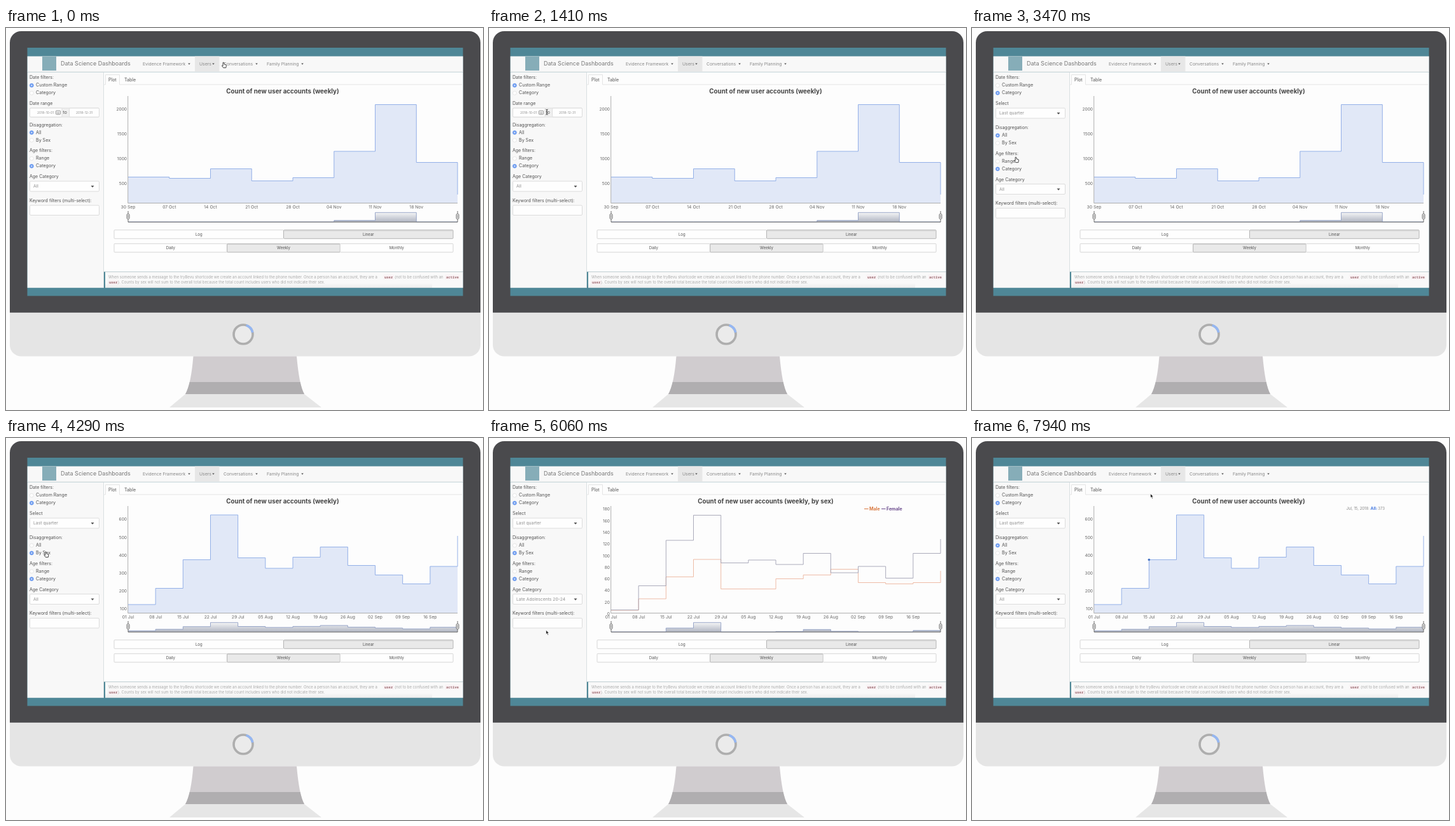
An HTML page with a canvas for the animation above (8000 ms loop, 750 px wide and 601 px high).

```html
<!DOCTYPE html>
<html lang="en">
<head>
<meta charset="utf-8">
<title>Dashboard demo</title>
<style>
  html, body { margin: 0; width: 100%; height: 100%; overflow: hidden; background: #fdfdfd; }
  canvas { display: block; }
</style>
</head>
<body>
<canvas id="stage" width="750" height="601"></canvas>
<script>
const ctx = document.getElementById('stage').getContext('2d');
const LOOP = 8000, LEFT = 192, RIGHT = 710, BASE = 275.5;
const BLUE = '#8aa9e6', ORANGE = '#edb59d', NAVY = '#a2a2b4';
const BORDER = '#dcdcdc';

// Chart data: step heights as stage y; end = height of the closing jump at the right edge
const quarter = {
  title: 'Count of new user accounts (weekly)', mini: .17,
  ticks: [500, 500, 4, 245, -39],
  days: '30 Sep,07 Oct,14 Oct,21 Oct,28 Oct,04 Nov,11 Nov,18 Nov',
  lines: [{ color: BLUE, y: [234.5, 236.5, 221.5, 240.5, 235.5, 194, 120.5, 211.5], end: 262 }]
};
const summer = '01 Jul,08 Jul,15 Jul,22 Jul,29 Jul,05 Aug,12 Aug,19 Aug,26 Aug,02 Sep,09 Sep,16 Sep';
const total = {
  title: quarter.title, mini: .092, days: summer,
  ticks: [100, 100, 6, 269, -28.1],
  lines: [{ color: BLUE, y: [262, 236.5, 191.5, 121, 188.5, 205, 187.5, 171.5, 200.5, 215.5, 229.5, 202], end: 154 }]
};
const bySex = {
  title: 'Count of new user accounts (weekly, by sex)', mini: .19, days: summer, legend: true,
  ticks: [0, 50, 8, 277, -23.6],
  lines: [
    { color: ORANGE, y: [268.5, 241, 224.5, 169.5, 212.5, 223, 207.5, 200.5, 204, 231.5, 231.5, 225.5], end: 208 },
    { color: NAVY, y: [260, 219.5, 186.5, 121.5, 182.5, 192, 182.5, 173, 203.5, 201.5, 221, 182.5], end: 138 }]
};
const lateTeens = {
  title: bySex.title, mini: .26, days: summer, legend: true,
  ticks: [0, 20, 10, 277, -18.28],
  lines: [
    { color: ORANGE, y: [271, 253, 218.5, 191, 237.5, 237.5, 221.5, 215.5, 206.5, 227.5, 229.5, 227.5], end: 209 },
    { color: NAVY, y: [270.5, 232.5, 161, 121.5, 196.5, 192, 199, 181.5, 212, 202, 220.5, 181.5], end: 159 }]
};
const chartTimes = [[0, quarter], [3650, total], [4470, bySex], [5760, lateTeens], [7060, bySex], [7650, total]];

const periods = ['This week', 'Last week', 'This month', 'Last month', 'This quarter', 'Last quarter', 'This year', 'Last year'];
const ages = ['All', 'Early Adolescents 10-14', 'Adolescents 15-19', 'Late Adolescents 20-24', 'Adults 25-34', 'Adults 35-49', 'Adults 50+'];

// Pointer: time, x, y of the tip, shape
const pointer = [
  [0, 342, 54, 'hand'], [900, 342, 54, 'arrow'], [1390, 91, 128, 'beam'], [1560, 91, 128, 'beam'],
  [1650, 74, 121, 'arrow'], [1780, 74, 121, 'arrow'], [2080, 41, 100, 'hand'], [2540, 41, 100, 'hand'],
  [2750, 72, 137, 'hand'], [2900, 72, 137, 'hand'], [3340, 69, 203, 'hand'], [3830, 69, 203, 'hand'],
  [4280, 62.5, 179, 'hand'], [4600, 62.5, 179, 'arrow'], [4940, 78, 250, 'hand'], [5130, 78, 250, 'hand'],
  [5400, 90, 304, 'arrow'], [6030, 90, 304, 'arrow'], [6310, 78, 250, 'hand'], [6480, 78, 250, 'hand'],
  [6760, 74, 264, 'hand'], [6950, 74, 264, 'arrow'], [7400, 45.5, 169, 'hand'], [7560, 45.5, 169, 'arrow'],
  [7650, 195, 125, 'arrow'], [7920, 280.5, 87.5, 'arrow'], [LOOP, 280.5, 87.5, 'arrow']
];

const lastBefore = (list, t) => list.filter(k => k[0] <= t).pop();

function text(s, x, y, size = 7, color = '#505050', align = 'left', weight = 400, family = 'Inter, sans-serif') {
  ctx.font = `${weight} ${size}px ${family}`;
  ctx.fillStyle = color;
  ctx.textAlign = align;
  ctx.textBaseline = 'middle';
  ctx.fillText(s, x, y);
}
function rect(x, y, w, h, fill, stroke, r = 0) {
  ctx.beginPath();
  ctx.roundRect(x, y, w, h, r);
  paint(fill, stroke);
}
function paint(fill, stroke, width = 1) {
  if (fill) { ctx.fillStyle = fill; ctx.fill(); }
  if (stroke) { ctx.strokeStyle = stroke; ctx.lineWidth = width; ctx.stroke(); }
}
function shape(points, fill, stroke, width) {
  ctx.beginPath();
  points.forEach(([x, y]) => ctx.lineTo(x, y));
  if (fill) ctx.closePath();
  paint(fill, stroke, width);
}
function circle(x, y, r, fill, stroke, width) {
  ctx.beginPath();
  ctx.arc(x, y, r, 0, 7);
  paint(fill, stroke, width);
}
function caret(x, y, size = 2, up = 1) {
  shape([[x - size, y - up], [x + size, y - up], [x, y + up * (size - .6)]], '#555');
}

function drawMonitor() {
  rect(0, 0, 750, 601, '#fdfdfd');
  rect(6, 5, 740, 511.5, '#e5e5e5', null, 18);
  rect(6, 5, 740, 442.8, '#4a4a4d', null, [18, 18, 0, 0]);
  rect(33.5, 31, 685, 390.5, '#4f8797');
  circle(373, 482, 15, '#ebebeb', '#aeaeae', 3.6);
  ctx.beginPath();
  ctx.arc(373, 482, 15, -1.25, -.2);
  paint(null, '#95b7f3', 3.6);
  shape([[282, 576], [469, 576], [496, 597], [257, 597]], '#e6e6e6');
  ctx.beginPath();
  ctx.moveTo(294.5, 516.5);
  ctx.quadraticCurveTo(291, 560, 282, 576);
  ctx.lineTo(469, 576);
  ctx.quadraticCurveTo(461, 562, 457, 516.5);
  paint('#d0cccf');
  ctx.save();
  ctx.clip();
  rect(280, 557, 192, 19, '#b0aeb0');
  ctx.restore();
}

function drawNav() {
  rect(33, 44, 687, 25, '#f8f8f8');
  rect(33, 68.5, 687, 1, '#e8e8e8');
  rect(57, 45, 22, 22, '#86adb8');
  text('Data Science Dashboards', 86, 56, 9, '#777');
  rect(297, 44, 38.5, 24.5, '#e7e7e7');
  [['Evidence Framework', 215, 288], ['Users', 304, 326], ['Conversations', 342, 394], ['Family Planning', 410, 466]]
    .forEach(([s, x, c]) => { text(s, x, 56.5, 6.8, '#888'); caret(c, 56.5, 1.8); });
}

function radio(s, y, on) {
  circle(40.3, y, 3, on ? '#6f9df0' : '#fff', on ? '#6f9df0' : '#ddd', .7);
  if (on) circle(40.3, y, 1.1, '#e8effc');
  text(s, 47, y, 7.1);
}
function select(value, y, open) {
  rect(37.5, y - 8, 109, 16, '#fefefe', BORDER, 1.5);
  text(value, 43, y + .3, 6.8, '#909090');
  caret(136, y, 2.5, open ? -1 : 1);
}
function menu(items, top, value, tipY) {
  rect(37.5, top, 109, items.length * 12, '#fff', '#d4d4d4');
  const hover = Math.floor((tipY - top) / 12);
  items.forEach((s, i) => {
    if (i === hover || (hover < 0 && s === value)) rect(38, top + i * 12, 108, 12, '#eef3fa');
    text(s, 43, top + 6 + i * 12, 6.8, '#777');
  });
}

function drawSidebar(t, tipY) {
  const category = t >= 2240, sex = t >= 4290 && t < 7440;
  const period = t < 3470 ? 'This quarter' : 'Last quarter';
  const age = t >= 5470 && t < 6880 ? ages[3] : ages[0];
  const periodOpen = t >= 2820 && t < 3470;
  const ageOpen = (t >= 5000 && t < 5470) || (t >= 6380 && t < 6880);
  const d = category ? 4.5 : 0;

  rect(33, 69.5, 120.5, 340, '#f8f8f8');
  rect(153, 69.5, .7, 340, '#e6e6e6');
  text('Date filters:', 37, 78);
  radio('Custom Range', 90.3, !category);
  radio('Category', 102.3, category);
  if (category) {
    text('Select', 37, 119);
    select(period, 134, periodOpen);
  } else {
    text('Date range', 37, 118.5);
    rect(37.5, 126, 109, 14, '#f0f0f0', BORDER, 1.5);
    rect(37.5, 126, 50.5, 14, '#fefefe', BORDER, 1.5);
    rect(99.5, 126, 47, 14, '#fefefe', BORDER, 1.5);
    text('2018-10-01', 49, 133.2, 5, '#909090');
    text('2018-12-31', 110, 133.2, 5, '#909090');
    rect(78.5, 130, 7, 6, '#f4f4f4', '#999', 1);
    rect(80, 132, 4, .7, '#999');
    rect(80, 134, 4, .7, '#999');
    text('to', 89.5, 133.2);
  }
  text('Disaggregation:', 37, 152.5 + d);
  radio('All', 164.5 + d, !sex);
  radio('By Sex', 176.5 + d, sex);
  text('Age filters:', 37, 193.3 + d);
  radio('Range', 205.3 + d, false);
  radio('Category', 217.3 + d, true);
  text('Age Category', 37, 234 + d);
  select(age, 249 + d, ageOpen);
  text('Keyword filters (multi-select):', 37, 271.5 + d);
  rect(37.5, 279 + d, 109, 15.5, '#fefefe', BORDER, 1.5);
  if (periodOpen) menu(periods, 142.5, period, tipY);
  if (ageOpen) menu(ages, 261.5, age, tipY);
}

function drawButtons(labels, active, y) {
  const w = 533 / labels.length;
  labels.forEach((s, i) => {
    const x = 170 + i * w, on = i === active;
    rect(x, y, w, 13.5, on ? '#e9e9e9' : '#fefefe', on ? '#b4b4b4' : '#d6d6d6', 1);
    if (on) rect(x + .5, y + .5, w - 1, 1.3, '#d2d2d2');
    text(s, x + w / 2, y + 7, 6, '#505050', 'center');
  });
}

function drawFrame() {
  rect(153.7, 69.5, 567, 314, '#fdfdfd');
  shape([[153.7, 89], [156.5, 89], [156.5, 73.5], [178.5, 73.5], [178.5, 89], [717, 89]], null, '#dfdfdf', .8);
  rect(157, 88, 21, 2, '#fdfdfd');
  text('Plot', 161, 81.5);
  text('Table', 186, 81.5);
  drawButtons(['Log', 'Linear'], 1, 317.8);
  drawButtons(['Daily', 'Weekly', 'Monthly'], 1, 339.3);

  rect(156, 384, 564, 26, '#f9f9f9');
  rect(156, 383.5, 564, .8, '#e2e2e2');
  const note = (s, x, y) => text(s, x, y, 5.9, '#aaa');
  const chip = (s, x, y) => {
    rect(x - 1.5, y - 4, s.length * 3.3 + 3, 8, '#f9f2f4', null, 1);
    text(s, x, y, 5.5, '#9d6a70', 'left', 700, '"Noto Sans Mono", monospace');
  };
  note('When someone sends a message to the tryBevu shortcode we create an account linked to the phone number. Once a person has an account, they are a', 161, 392);
  chip('user', 595, 392);
  note('(not to be confused with an', 611, 392);
  chip('active', 692, 392);
  chip('user', 162, 400.3);
  note('). Counts by sex will not sum to the overall total because the total count includes users who did not indicate their sex.', 176, 400.3);
  const shade = ctx.createLinearGradient(0, 401, 0, 409);
  shade.addColorStop(0, 'rgba(0,0,0,0)');
  shade.addColorStop(1, 'rgba(0,0,0,.05)');
  rect(80, 401, 590, 8, shade);
}

// Corner points of a step line through the given heights
function steps(ys) {
  const w = (RIGHT - LEFT) / ys.length;
  return ys.flatMap((y, i) => [[LEFT + i * w, y], [LEFT + (i + 1) * w, y]]);
}
const closed = (points, base) => [[LEFT, base], ...points, [RIGHT, base]];

function drawChart(chart) {
  const { lines, ticks: [first, step, count, y0, dy], days } = chart;
  text(chart.title, 435, 100, 9.75, '#444', 'center', 700);
  if (lines.length === 1) shape(closed(steps(lines[0].y), BASE), '#e1e8f7');
  shape([[191.7, 107], [191.7, BASE], [RIGHT, BASE]], null, '#a6a6a6', .9);
  lines.forEach(l => shape([...steps(l.y), [RIGHT, l.end]], null, l.color, .9));
  for (let i = 0; i < count; i++) text(first + i * step, 190, y0 + i * dy, 6.6, '#666', 'right');
  const names = days.split(','), w = (RIGHT - LEFT) / names.length;
  names.forEach((s, i) => text(s, LEFT + i * w, 282.3, 6.8, '#666', 'center'));

  // Range selector
  const mean = lines[0].y.map((_, i) => lines.reduce((sum, l) => sum + l.y[i], 0) / lines.length);
  const top = Math.min(...mean);
  const small = steps(mean.map(y => Math.min(305, 290.3 + (y - top) * chart.mini)));
  const fade = ctx.createLinearGradient(0, 289, 0, 305);
  fade.addColorStop(0, '#fafafa');
  fade.addColorStop(1, '#b1b6c3');
  shape(closed(small, 305), fade);
  shape(small, null, '#8f9fc4', .9);
  shape([[LEFT, 288], [LEFT, 305.3], [RIGHT, 305.3], [RIGHT, 288]], null, '#666', 1);
  [LEFT, RIGHT].forEach(x => {
    rect(x - 2, 292.5, 4, 8, '#eee', '#777', 1.5);
    rect(x - .4, 294, .8, 5, '#777');
  });

  if (chart.legend) {
    [['Male', 590, '#d9783f'], ['Female', 617, '#6a4a8c']].forEach(([s, x, c]) => {
      shape([[x, 111.5], [x + 6.5, 111.5]], null, c, 1.2);
      text(s, x + 8, 111.5, 7, c, 'left', 700);
    });
  }
}

function drawHover(x) {
  const i = Math.round((x - LEFT) * 12 / (RIGHT - LEFT));
  circle(LEFT + i * (RIGHT - LEFT) / 12, total.lines[0].y[i], 1.8, '#4672c4');
  text(`Jul, ${1 + 7 * i}, 2018:`, 625, 111.5, 6, '#888', 'right');
  text('All:', 626.5, 111.5, 6.6, '#4a7de0', 'left', 700);
  text([124, 215, 373][i], 649, 111.5, 6, '#888', 'right');
}

function pointerAt(t) {
  const i = pointer.findLastIndex(k => k[0] <= t);
  const a = pointer[i], b = pointer[i + 1];
  const p = (t - a[0]) / (b[0] - a[0]), e = p * p * (3 - 2 * p);
  return [a[1] + (b[1] - a[1]) * e, a[2] + (b[2] - a[2]) * e, a[3]];
}
function drawPointer(x, y, kind) {
  ctx.save();
  ctx.translate(x, y);
  ctx.lineJoin = 'round';
  if (kind === 'arrow') {
    shape([[0, 0], [0, 6.6], [1.5, 5.3], [2.7, 8], [3.9, 7.4], [2.8, 4.9], [4.7, 4.7]], '#222', '#fff', .7);
  } else if (kind === 'hand') {
    shape([[-1, .5], [0, 0], [.8, .6], [1, 3], [4, 3.8], [4.4, 5], [3.8, 8.6], [-.2, 8.6], [-2.6, 5.4], [-2, 4.7], [-.8, 5.6]],
      '#fff', '#333', .9);
  } else {
    shape([[-1.6, 0], [0, .7], [1.6, 0]], null, '#333', .9);
    shape([[0, .7], [0, 7.8]], null, '#333', 1);
    shape([[-1.6, 8.5], [0, 7.8], [1.6, 8.5]], null, '#333', .9);
  }
  ctx.restore();
}

function draw(now) {
  const t = now % LOOP;
  const [x, y, kind] = pointerAt(t);
  drawMonitor();
  ctx.save();
  ctx.beginPath();
  ctx.rect(33.6, 44.6, 685, 364.2);
  ctx.clip();
  drawNav();
  drawFrame();
  drawChart(lastBefore(chartTimes, t)[1]);
  if (t >= 7700) drawHover(x);
  drawSidebar(t, y);
  drawPointer(x, y, kind);
  ctx.restore();
  requestAnimationFrame(draw);
}
requestAnimationFrame(draw);
</script>
</body>
</html>
```
